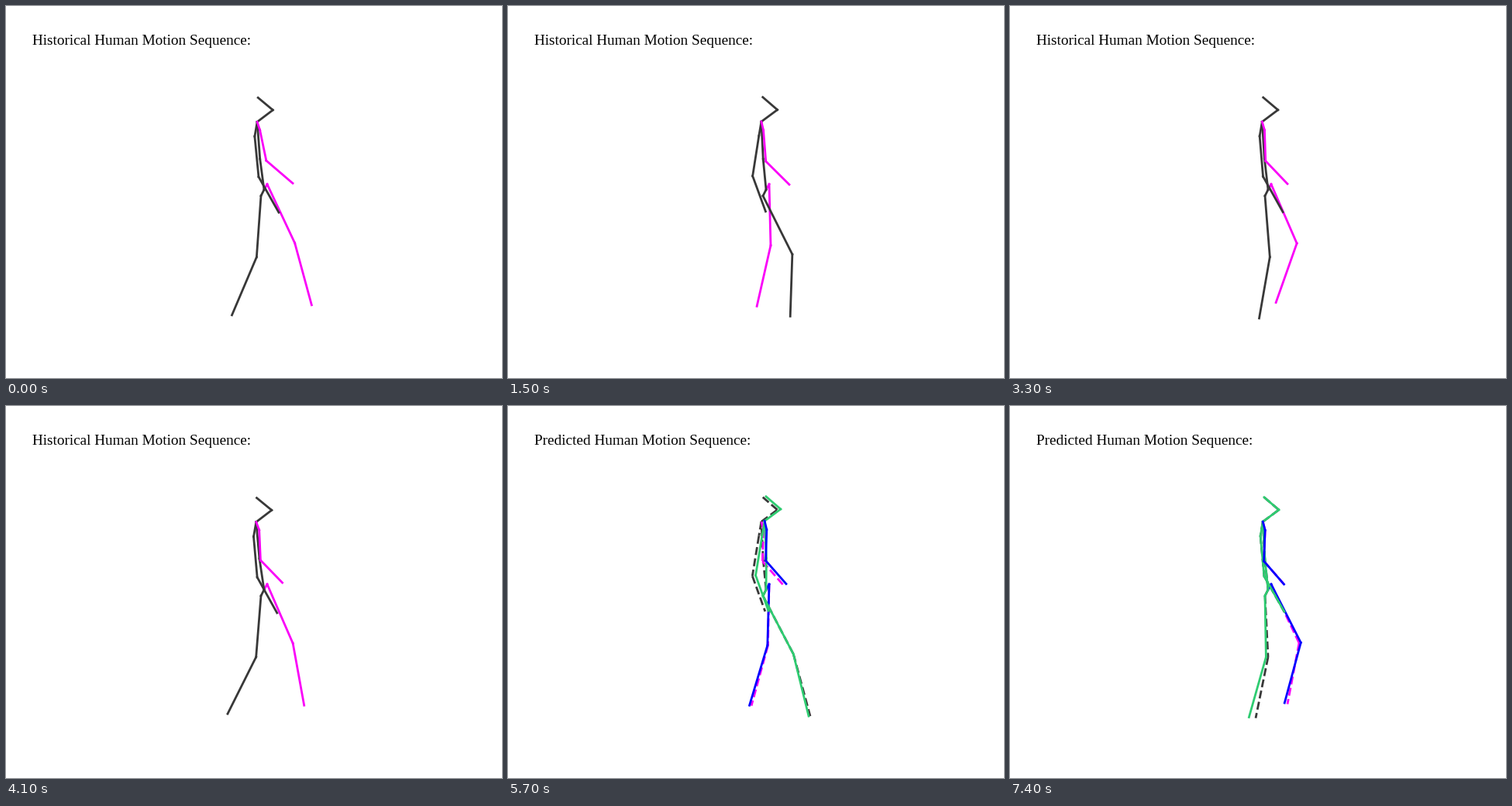
A matplotlib script that plays this animation: 640x480 px, repeating every 7.5 s.

```python
import numpy as np
import matplotlib.pyplot as plt
from matplotlib.animation import FuncAnimation

FRAMES, PAST, STRIDE = 75, 50, 40      # total, observed part, frames per stride
DARK, PINK, GREEN, BLUE = "#383838", "#fa00f8", "#2ecc71", "#0000ff"

# Forward reach of thigh and shank, evenly spaced over one stride
THIGH = [31, 24, 14, 4, -3, -6, 5, 21, 36, 39]
SHANK = [9, 0, -7, -16, -24, -42, -68, -60, -15, 28]

CHAINS = [
    ("l", "root hip_l knee_l foot_l"),
    ("r", "root hip_r knee_r foot_r"),
    ("r", "root spine neck face head"),
    ("r", "neck shoulder_r elbow_r hand_r"),
    ("l", "neck shoulder_l elbow_l hand_l"),
]


def cycle(keys, t):
    """Closed Catmull-Rom curve over one stride."""
    s = (t - 2) * len(keys) / STRIDE
    i = int(np.floor(s))
    u = s - i
    a, b, c, d = (keys[(i + k) % len(keys)] for k in (-1, 0, 1, 2))
    return b + u / 2 * (c - a + u * (2 * a - 5 * b + 4 * c - d
                                     + u * (3 * (b - c) + d - a)))


def leg(hip, t, error):
    """Knee and foot; the forecast leads at the hip and lags at the knee."""
    x, y = hip
    dx = cycle(THIGH, t + 1.3 * error)
    knee = x + dx, y + 79 - dx ** 2 / 400
    dx = cycle(SHANK, t) - 6 * error
    return knee, (knee[0] + dx, knee[1] + 80 - min(dx, 0) ** 2 / 200)


def pose(n, error=0):
    bob = np.cos(4 * np.pi * (n - 16) / STRIDE)     # twice per stride
    swing = np.cos(2 * np.pi * (n - 37) / STRIDE)   # right arm
    reach = np.exp(-n / 30)                         # left arm relaxes
    off = 5 * np.sin(np.pi * error)                 # forecast lean

    def upper(x, y, bx, by):
        return x + bx * bob + off, y + by * bob - off / 5

    j = {
        "root": (333, 237), "hip_r": (329, 245), "hip_l": (337, 230),
        "head": upper(323.5, 118.6, 5.5, -1),
        "face": upper(342.8, 134.4, 5, -.5),
        "neck": upper(322.8, 149.7, 4.3, -.5),
        "spine": upper(327, 197, 2.3, .5),
        "shoulder_r": upper(319.5, 168.5, 4.5, -1),
        "elbow_r": upper(318.5 + 7 * swing, 221, 4, -1.7),
        "hand_r": upper(340 + 12 * swing, 267, 4, -2),
        "shoulder_l": upper(326.7, 160, 3, .3),
        "elbow_l": upper(326 + 9.5 * reach, 199, 1, 1.5),
        "hand_l": upper(352 + 18 * reach, 228, 0, 2.5),
    }
    j["knee_l"], j["foot_l"] = leg(j["hip_l"], n, error)
    j["knee_r"], j["foot_r"] = leg(j["hip_r"], n + STRIDE / 2, error)
    return j


fig = plt.figure(figsize=(6.4, 4.8), dpi=100, facecolor="white")
ax = fig.add_axes([0, 0, 1, 1])
ax.set(xlim=(0, 640), ylim=(480, 0))
ax.axis("off")
title = ax.text(33.6, 50, "", family="Liberation Serif", size=13.9,
                color="black", va="baseline")


def skeleton(right, left):
    bones = []
    for side, chain in CHAINS:
        names = chain.split()
        for a, b in zip(names, names[1:]):
            line, = ax.plot([], [], lw=2, color=left if side == "l" else right)
            bones.append((line, a, b))
    return bones


real = skeleton(DARK, PINK)
guess = skeleton(GREEN, BLUE)


def place(bones, joints):
    for line, a, b in bones:
        line.set_data(*zip(joints[a], joints[b]))


def draw(n):
    future = n >= PAST
    title.set_text(("Predicted" if future else "Historical")
                   + " Human Motion Sequence:")
    place(real, pose(n))
    place(guess, pose(n, max(0, (n - PAST + 1) / (FRAMES - PAST))))
    for line, *_ in real:
        line.set_linestyle("--" if future else "-")
    for line, *_ in guess:
        line.set_visible(future)
    return [title]


anim = FuncAnimation(fig, draw, frames=FRAMES, interval=100,
                     init_func=lambda: draw(0), repeat=True, repeat_delay=0)
plt.show()
```
